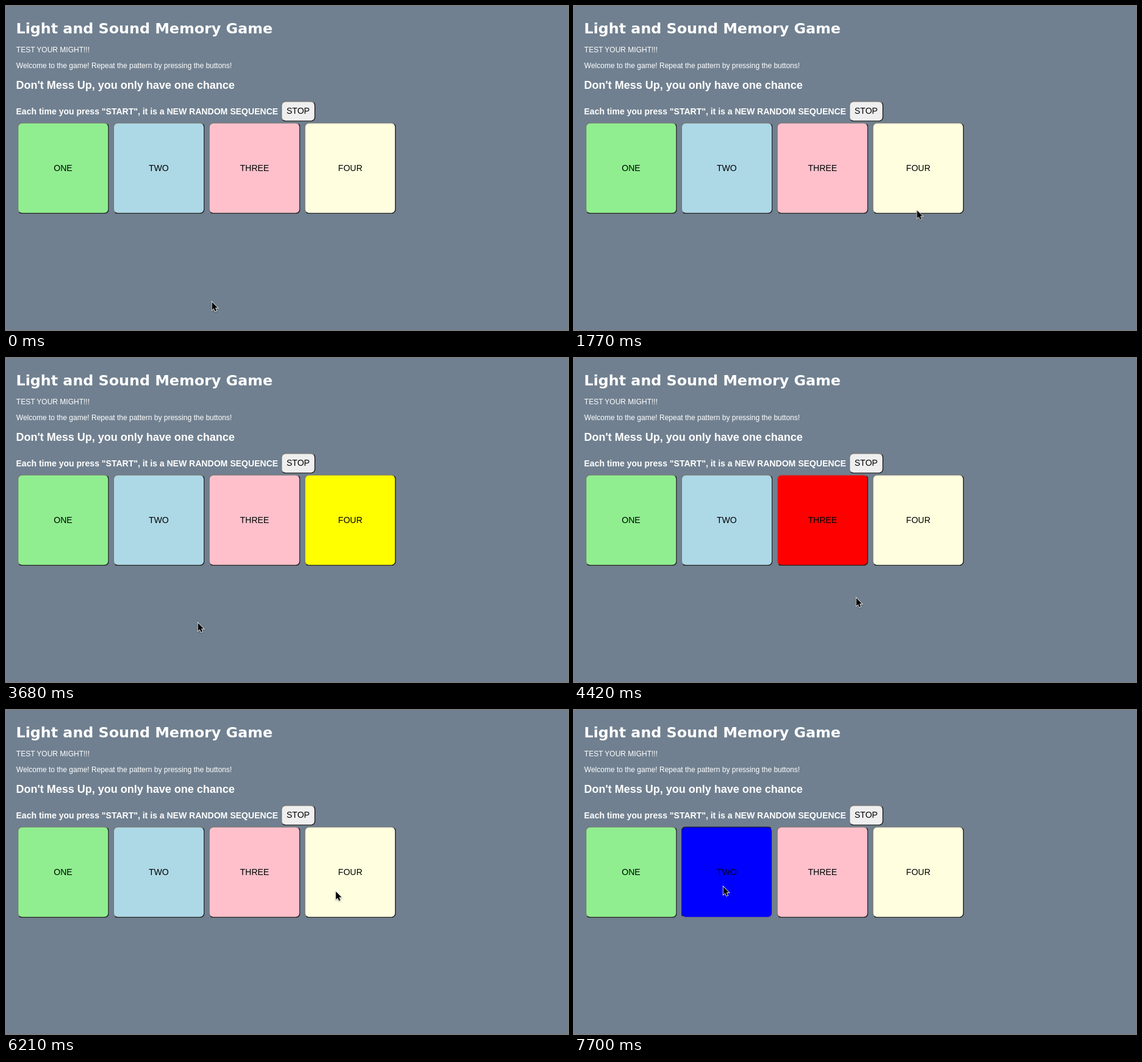
These frames come from a looping animation (921 px wide and 532 px high, 8 s). An HTML page:

```html
<!DOCTYPE html>
<html lang="en">
<head>
<meta charset="utf-8">
<title>Memory Game</title>
<style>
  html, body { margin: 0; width: 100%; height: 100%; overflow: hidden; background: slategray; }
  body { position: relative; font-family: "Liberation Sans", Arial, sans-serif; }

  .copy { position: absolute; left: 0; top: 0; fill: #fff; }
  .title { font: bold 23.77px "DejaVu Sans", Verdana, sans-serif; }
  .bold { font-weight: bold; }

  /* Page zoom of 75% */
  .zoom { position: absolute; left: 0; top: 0; transform: scale(.75); transform-origin: 0 0; }

  .btn {
    --up: #767676 #212121 #212121 #767676;
    --down: #212121 #767676 #767676 #212121;
    position: absolute; box-sizing: border-box;
    display: flex; align-items: center; justify-content: center;
    border: 2px solid; border-color: var(--up); border-radius: 10px;
    font-size: 18.72px; color: #000;
  }
  .stop { left: 601px; top: 208px; width: 74.5px; height: 44.5px; background: #efefef; }
  .pad { top: 255.33px; width: 200px; height: 200px; animation: 8s step-end infinite; }
  .one { left: 24.67px; background: lightgreen; }
  .two { left: 233.87px; background: lightblue; animation-name: two; }
  .three { left: 443.07px; background: pink; animation-name: three; }
  .four { left: 652.27px; background: lightyellow; animation-name: four; }

  @keyframes two {
    0% { background: lightblue; border-color: var(--up); }
    96.2%, 100% { background: blue; border-color: var(--down); }
  }
  @keyframes three {
    0%, 68.3%, 84.95%, 100% { background: pink; border-color: var(--up); }
    55.2% { background: red; border-color: var(--up); }
    83.05% { background: red; border-color: var(--down); }
  }
  @keyframes four {
    0%, 20.2%, 25.7%, 51.45%, 77.6%, 100% { background: lightyellow; border-color: var(--up); }
    7.45%, 38.6% { background: yellow; border-color: var(--up); }
    23.95%, 73.8% { background: yellow; border-color: var(--down); }
  }

  .cursor {
    position: absolute; left: 0; top: 0; overflow: visible;
    filter: drop-shadow(0 1px 1px rgba(0, 0, 0, .35));
    animation: roam 8s linear infinite;
  }
  /* The pointer is sampled about every 147 ms, so it moves in steps */
  @keyframes roam {
    0% { transform: translate(337px, 485px); }
    3.7% { transform: translate(337px, 485px); animation-timing-function: steps(8, jump-start); }
    18.3% { transform: translate(559px, 342px); animation-timing-function: steps(6, jump-start); }
    29.4% { transform: translate(564px, 327px); animation-timing-function: steps(2, jump-start); }
    33% { transform: translate(270px, 427px); animation-timing-function: steps(4, jump-start); }
    40.4% { transform: translate(243px, 423px); }
    42.3% { transform: translate(243px, 423px); animation-timing-function: steps(1, jump-start); }
    44.1% { transform: translate(216px, 426px); animation-timing-function: steps(2, jump-start); }
    47.8% { transform: translate(314px, 434px); animation-timing-function: steps(5, jump-start); }
    56.9% { transform: translate(462px, 393px); }
    58.95% { transform: translate(462px, 393px); animation-timing-function: steps(2, jump-start); }
    62.7% { transform: translate(541px, 295px); }
    70.2% { transform: translate(541px, 295px); animation-timing-function: steps(1, jump-start); }
    72% { transform: translate(540px, 297px); }
    79.3% { transform: translate(540px, 297px); animation-timing-function: steps(3, jump-start); }
    84.8% { transform: translate(418px, 290px); }
    88.7% { transform: translate(418px, 290px); animation-timing-function: steps(5, jump-start); }
    98%, 100% { transform: translate(244px, 289px); }
  }
</style>
</head>
<body>
  <svg class="copy" width="921" height="190">
    <text class="title" x="16.5" y="45">Light and Sound Memory Game</text>
    <text x="16.8" y="76" font-size="12">TEST YOUR MIGHT!!!</text>
    <text x="16.8" y="102" font-size="12">Welcome to the game! Repeat the pattern by pressing the buttons!</text>
    <text class="bold" x="16.5" y="136.3" font-size="18">Don't Mess Up, you only have one chance</text>
    <text class="bold" x="16.5" y="178.3" font-size="14.04">Each time you press "START", it is a NEW RANDOM SEQUENCE</text>
  </svg>

  <div class="zoom">
    <div class="btn stop">STOP</div>
    <div class="btn pad one">ONE</div>
    <div class="btn pad two">TWO</div>
    <div class="btn pad three">THREE</div>
    <div class="btn pad four">FOUR</div>
  </div>

  <svg class="cursor" width="12" height="18">
    <path d="M.6 1V14.2L3.6 11.4 5.8 16.3 8 15.3 5.9 10.6H10Z" stroke="#fff" stroke-width="1.6" paint-order="stroke"/>
  </svg>
</body>
</html>
```
